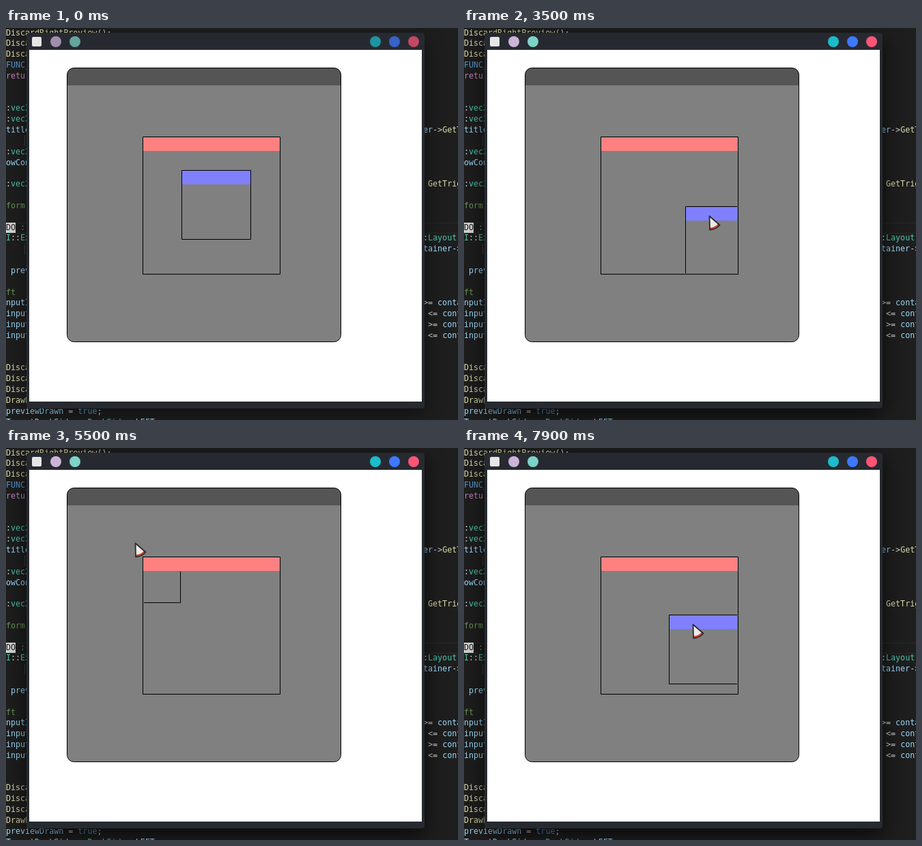
Write an HTML page with a canvas that moves like this. It is 662 by 574 pixels and loops after 8 s.

```html
<!DOCTYPE html>
<html>
<head>
<meta charset="utf-8">
<style>
  html, body { margin: 0; width: 662px; height: 574px; overflow: hidden; background: #1e1e1e; }
  canvas { display: block; }
</style>
</head>
<body>
<canvas width="662" height="574"></canvas>
<script>
const ctx = document.querySelector('canvas').getContext('2d');
const LOOP = 8000, STEP = 100, DRAG_START = 2050;
const FONT = 14 / 1.2, LINE = 19 / 1.2, CHAR = 7.0234, RIGHT_COLUMN = 87;

const INK = { y: '#dcdcaa', w: '#d4d4d4', b: '#569cd6', p: '#c586c0', t: '#4ec9b0', v: '#9cdcfe', g: '#6a9955', k: '#1e1e1e' };

// Editor lines: runs of colour letter + text split by "·", the part right of the window after "|".
const CODE = `yDiscardRightPreview·w();
yDisca
yDisca
bFUNC_
preturn


w:·tvec2
w:·tvec2
vtitle|ver·w->·yGetT

w:·tvec2
vowCon

w:·tvec2|w ·yGetTrig

gform

kDO·g :
tI·w::·tEx|w:·tLayout·w:
|vtainer·w->

v prev

gft
vnputI|w>= ·vconta
vinput|w <= ·vcont
vinput|w >= ·vcont
vinput|w <= ·vcont


yDisca
yDisca
yDisca
yDrawL
vpreviewDrawn·w = ·btrue·w;
vTargetDockSide·w = ·tDockSide·w::·vLEFT`.split('\n');

const BUTTONS = { 73: '#cdb3d8', 101: '#7dd3c7', 541: '#1cbccb', 569: '#3f78ff', 597: '#ff5476' };

// Pointer gestures: start, end, then points passed at even intervals from the previous resting place.
const ENTRY = [573, 181];
const GESTURES = [
  [400, 1200, [425, 193], [300, 214], [308, 220]],
  [1600, 2500, [292, 223], [269, 217]],
  [2500, 2700, [306, 224]],
  [2800, 3100, [357, 237]],
  [3300, 3700, [361, 315]],
  [3800, 4600, [310, 331], [228, 311]],
  [4700, 5500, [184, 245], [189, 140]],
  [5500, 6600, [235, 112], [360, 170], [429, 265], [361, 346]],
  [6600, 7400, [240, 375], [192, 325], [319, 243]],
  [7400, 7900, [313, 241], [335, 259]],
];

const clamp = v => Math.min(1, Math.max(0, v));

// Catmull-Rom curve through the points, u from 0 to 1.
function spline(points, u) {
  const last = points.length - 1;
  const i = Math.min(Math.floor(u * last), last - 1), f = u * last - i;
  const at = k => points[Math.min(last, Math.max(0, k))];
  return [0, 1].map(axis => {
    const [a, b, c, d] = [-1, 0, 1, 2].map(k => at(i + k)[axis]);
    const curve = b + f / 2 * (c - a + f * (2 * a - 5 * b + 4 * c - d + f * (3 * (b - c) + d - a)));
    return Math.round(curve);
  });
}

function pointerAt(t) {
  let rest = ENTRY;
  for (const [start, end, ...points] of GESTURES) {
    if (t < start) break;
    rest = spline([rest, ...points], clamp((t - start) / (end - start)));
  }
  return rest;
}

function rect(x, y, w, h, color) {
  ctx.fillStyle = color;
  ctx.fillRect(x, y, w, h);
}

function rounded(x, y, w, h, r, color) {
  ctx.beginPath();
  ctx.roundRect(x, y, w, h, r);
  ctx.fillStyle = color;
  ctx.fill();
}

function outline(path, color, width) {
  ctx.strokeStyle = color;
  ctx.lineWidth = width;
  ctx.stroke(path);
}

function panel(x, y, size, header, color, radius) {
  const shape = new Path2D();
  shape.roundRect(x + .5, y + .5, size - 1, size - 1, radius);
  ctx.save();
  ctx.clip(shape);
  rect(x, y, size, size, '#808080');
  rect(x, y, size, header, color);
  ctx.restore();
  outline(shape, '#000', 1);
}

function codeRuns(text, column, baseline) {
  let x = column * CHAR;
  for (const run of text.split('·')) {
    ctx.fillStyle = INK[run[0]];
    ctx.fillText(run.slice(1), x, baseline);
    x += (run.length - 1) * CHAR;
  }
}

function editor() {
  rect(0, 0, 662, 574, '#1e1e1e');
  for (const y of [285, 300]) rect(0, y, 662, 1, '#292929');
  for (const y of [157, 316]) rect(27, y, 1, 16, '#404040');
  rect(0, 285, 14, 15, '#d4d4d4');
  ctx.font = `${FONT}px "DejaVu Sans Mono", monospace`;
  CODE.forEach((line, row) => {
    const baseline = Math.floor(row * LINE + 11);
    const [left, right = ''] = line.split('|');
    codeRuns(left, 0, baseline);
    codeRuns(right, RIGHT_COLUMN, baseline);
  });
}

function frame(focus) {
  ctx.save();
  ctx.shadowColor = `rgba(0,0,0,${.45 + .25 * focus})`;
  ctx.shadowBlur = 30;
  ctx.shadowOffsetY = 9;
  rounded(30, 7, 583, 550, 4, '#262a30');
  ctx.restore();
  rounded(38, 13, 14, 14, 2, '#e6e6e6');
  ctx.globalAlpha = .73 + .27 * focus;
  for (const x in BUTTONS) rounded(x - 8, 12, 16, 16, 8, BUTTONS[x]);
  ctx.globalAlpha = 1;
  rect(34, 32, 575, 515, '#fff');
}

function pointer(x, y) {
  const wedge = new Path2D('M0 0L15 13Q9 20 .5 20Z');
  ctx.save();
  ctx.translate(x + .5, y - .5);
  ctx.lineJoin = 'round';
  ctx.fillStyle = '#eee9e6';
  ctx.fill(wedge);
  ctx.save();
  ctx.clip(wedge);
  outline(new Path2D('M15 13Q9 20 .5 20'), '#d2402f', 6);
  ctx.restore();
  outline(wedge, '#2b2b2b', 1.8);
  ctx.restore();
}

function draw(t) {
  const [x, y] = pointerAt(t);
  const [boxX, boxY] = t < DRAG_START ? [257, 208] : [x - 35, y - 15];
  editor();
  frame(clamp((t - 1600) / 200));
  panel(89, 58, 402, 26, '#555', 10);
  panel(200, 159, 202, 21, '#ff8080', 0);
  ctx.save();
  ctx.beginPath();
  ctx.rect(202, 181, 198, 178);
  ctx.clip();
  panel(boxX, boxY, 102, 21, '#8080ff', 0);
  ctx.restore();
  if (t >= GESTURES[0][0]) pointer(x, y);
}

const start = performance.now();
function tick() {
  const t = (performance.now() - start) % LOOP;
  draw(Math.floor(t / STEP) * STEP);
  requestAnimationFrame(tick);
}
tick();
</script>
</body>
</html>
```
